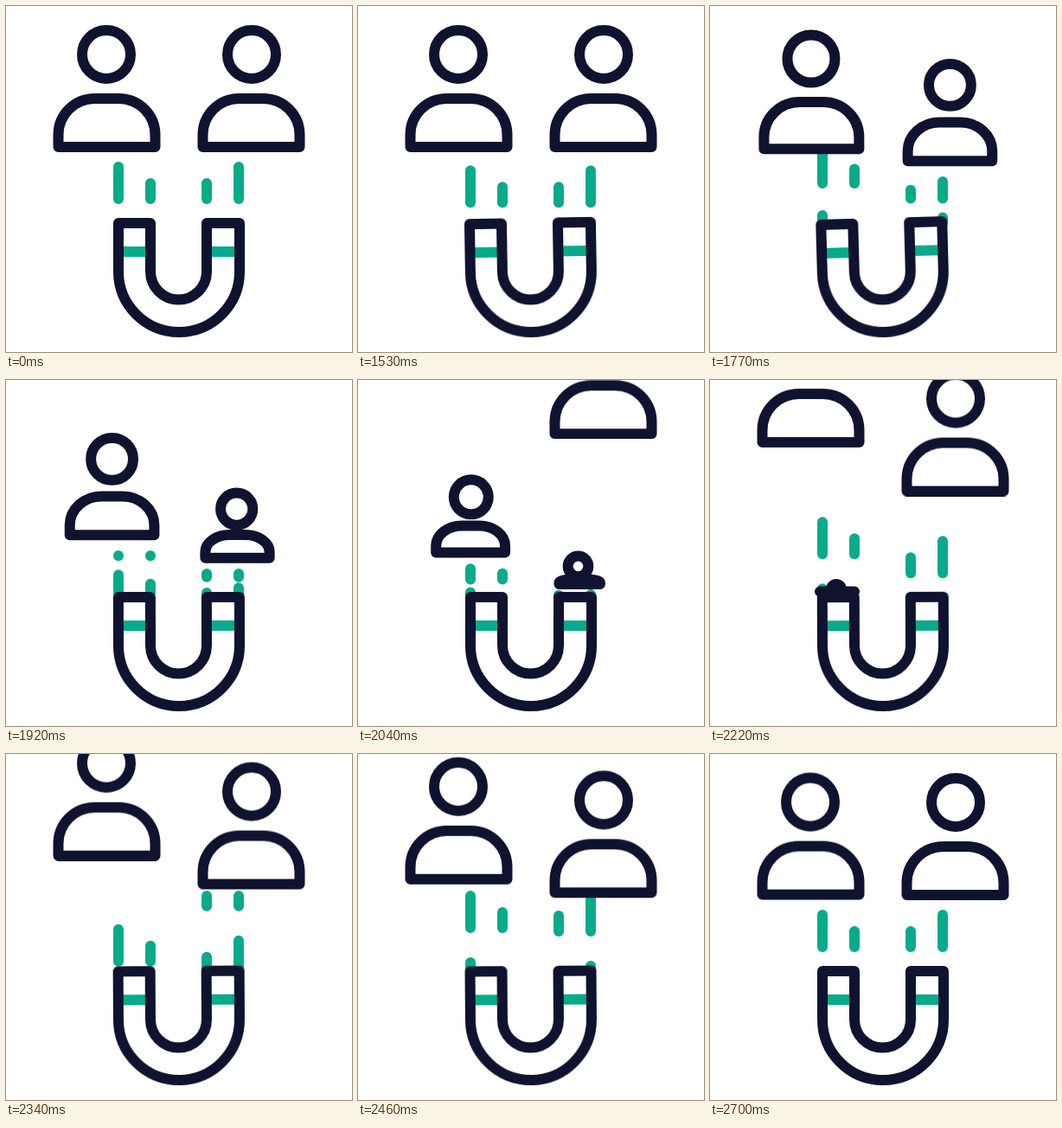
Animation, 400 px wide and 400 px high, one loop 2730 ms. Source, as an HTML page without scripts:

```html
<!DOCTYPE html>
<html lang="en">
<head>
<meta charset="utf-8">
<title>Magnet attracting people</title>
<style>
  @property --amp { syntax: "<angle>"; inherits: false; initial-value: 0deg; }
  @property --swing { syntax: "<number>"; inherits: false; initial-value: 0; }

  :root {
    --loop: 2730ms;
    --dark: #10132f;
    --green: #07ab89;
  }
  html, body { margin: 0; width: 100%; height: 100%; overflow: hidden; background: #fff; }
  svg { display: block; width: 100vw; height: 100vh; }
  path, circle { fill: #fff; stroke: var(--dark); stroke-width: 12; stroke-linejoin: round; }

  .left { --lag: 150ms; --drop-lag: 160ms; --flow: flow-left; }
  .right { --lag: 0ms; --drop-lag: 0ms; --flow: flow-right; }

  .body { d: path("M60.5 163V149A42 42 0 0 1 102.5 107H130.5A42 42 0 0 1 172.5 149V163Z"); }
  .head { cx: 116px; cy: 56px; r: 28px; }
  .leaving { animation: vanish var(--loop) linear var(--lag) infinite both; }
  .leaving .body { animation: flatten var(--loop) linear var(--lag) infinite both; }
  .leaving .head { animation: sink var(--loop) linear var(--lag) infinite both; }
  .arriving { animation: drop var(--loop) linear var(--drop-lag) infinite both; }

  /* Dashes run from the magnet up to the person; pathLength squeezes them as the gap closes. */
  .pull {
    d: path("M0 251V164");
    fill: none;
    stroke: var(--green);
    stroke-linecap: round;
    stroke-dashoffset: -28;
    animation: reach var(--loop) linear var(--lag) infinite both,
               var(--flow) var(--loop) linear infinite;
  }
  .long { stroke-dasharray: 37 40; }
  .short { stroke-dasharray: 18 59; }

  .magnet {
    transform-origin: 200px 314px;
    transform: rotate(calc(var(--amp) * var(--swing)));
    animation: shake var(--loop) linear infinite,
               swing calc(var(--loop) / 23) -36.5ms infinite;
  }
  .band { fill: none; stroke: var(--green); }

  /* Flattening and sinking speed up quadratically. */
  @keyframes flatten {
    0% { d: path("M60.5 163V149A42 42 0 0 1 102.5 107H130.5A42 42 0 0 1 172.5 149V163Z"); }
    56.04% {
      d: path("M60.5 163V149A42 42 0 0 1 102.5 107H130.5A42 42 0 0 1 172.5 149V163Z");
      animation-timing-function: cubic-bezier(.333, 0, .667, .333);
    }
    75.82%, 100% { d: path("M127 244.5V244.5A15 0 0 0 1 142 244.5H152A15 0 0 0 1 167 244.5V244.5Z"); }
  }
  @keyframes sink {
    0% { cx: 116px; cy: 56px; r: 28px; }
    56.04% {
      cx: 116px; cy: 56px; r: 28px;
      animation-timing-function: cubic-bezier(.333, 0, .667, .333);
    }
    74.73% { cx: 145.5px; cy: 214.5px; r: 12px; }
    75.82%, 100% { cx: 146px; cy: 242px; r: 6px; }
  }
  @keyframes vanish {
    0%, 76.9% { visibility: visible; }
    76.91%, 100% { visibility: hidden; }
  }
  @keyframes drop {
    0% { transform: translateY(-175px); }
    70.33% {
      transform: translateY(-175px);
      animation-timing-function: cubic-bezier(.333, 1, .667, 1);
    }
    96.7%, 100% { transform: translateY(0); }
  }
  @keyframes reach {
    0%, 58.24% { d: path("M0 251V164"); }
    64.84% { d: path("M0 251V203"); }
    69.23% { d: path("M0 251V218"); }
    74.73% { d: path("M0 251V247"); }
    75.6% { d: path("M0 251V248"); }
    75.7%, 100% { d: path("M0 251V164"); }
  }
  @keyframes flow-left {
    0%, 56.03% { stroke-dashoffset: -28; }
    56.04% { stroke-dashoffset: -24; }
    64.84% { stroke-dashoffset: 27; }
    74.73% { stroke-dashoffset: 99; }
    81.32% { stroke-dashoffset: 181; }
    90.11% { stroke-dashoffset: 258; }
    98.9%, 100% { stroke-dashoffset: 280; }
  }
  @keyframes flow-right {
    0%, 56.03% { stroke-dashoffset: -28; }
    56.04% { stroke-dashoffset: -24; }
    64.84% { stroke-dashoffset: 25; }
    74.73% { stroke-dashoffset: 122; }
    81.32% { stroke-dashoffset: 203; }
    90.11% { stroke-dashoffset: 262; }
    98.9%, 100% { stroke-dashoffset: 280; }
  }
  @keyframes shake {
    0%, 56.03% { --amp: 0deg; }
    56.04% { --amp: 1deg; }
    64.84%, 95% { --amp: 1.6deg; }
    98.9%, 100% { --amp: 0deg; }
  }
  @keyframes swing {
    0% { --swing: 0; animation-timing-function: ease-out; }
    25% { --swing: -1; animation-timing-function: ease-in-out; }
    75% { --swing: 1; animation-timing-function: ease-in; }
    100% { --swing: 0; }
  }
</style>
</head>
<body>
<svg viewBox="0 0 400 400">
  <g class="left">
    <path class="pull long" pathLength="87" transform="translate(130)"/>
    <path class="pull short" pathLength="87" transform="translate(167)"/>
    <g class="leaving"><path class="body"/><circle class="head"/></g>
    <g class="arriving"><path class="body"/><circle class="head"/></g>
  </g>
  <g class="right" transform="matrix(-1 0 0 1 400 0)">
    <path class="pull long" pathLength="87" transform="translate(131)"/>
    <path class="pull short" pathLength="87" transform="translate(168)"/>
    <g class="leaving"><path class="body"/><circle class="head"/></g>
    <g class="arriving"><path class="body"/><circle class="head"/></g>
  </g>
  <g class="magnet">
    <path d="M130 251H167V307A32.5 32.5 0 0 0 232 307V251H270V307A70 70 0 0 1 130 307Z"/>
    <path class="band" d="M136 284H161M238 284H264"/>
  </g>
</svg>
</body>
</html>
```
